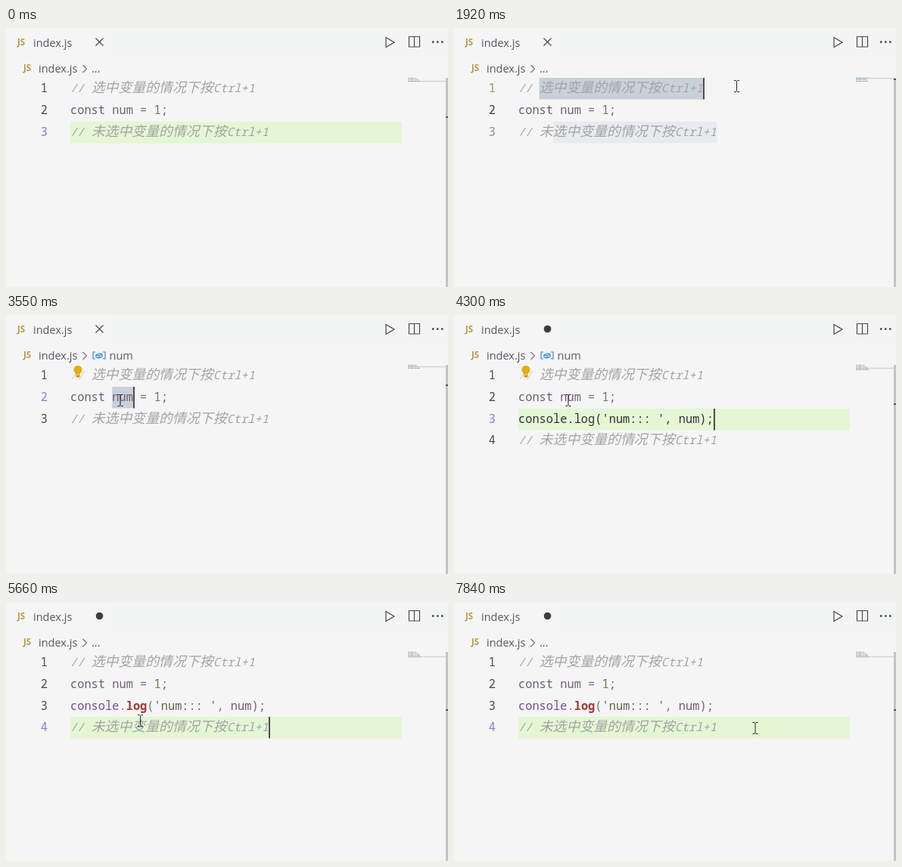
Write an HTML page that moves like this. It is 584 px wide and 343 px high and loops after 8 s.

```html
<!DOCTYPE html>
<html lang="zh">
<head>
<meta charset="utf-8">
<style>
  html, body { margin: 0; width: 100%; height: 100%; overflow: hidden; background: #f5f5f5; }
  svg { display: block; width: 100vw; height: 100vh; }
  text { white-space: pre; }
  .ui { font: 14.5px "Open Sans", "Noto Sans", sans-serif; fill: #5a565e; }
  .js { font: bold 11.5px "Open Sans", sans-serif; fill: #b79d48; }
  .code { font: 15.35px "Noto Sans Mono", "DejaVu Sans Mono", monospace; }
  .comment { font-style: italic; fill: #a4a4a4; }
  .cjk { font: italic 300 17.9px "Noto Sans CJK SC", "Noto Sans CJK", sans-serif; }
  .bold { font-weight: bold; }
  .line { fill: none; stroke: #4d4650; stroke-width: 1.2; }
  .blue { stroke: #2d8fd0; }
</style>
</head>
<body>
<svg viewBox="0 0 584 343" preserveAspectRatio="none">
  <rect width="584" height="343" fill="#f5f5f5"/>
  <rect x="140" width="444" height="38" fill="#f3f5f4"/>

  <text class="js" x="15" y="23">JS</text>
  <text class="ui" x="36" y="25">index.js</text>
  <path id="close" class="line" d="M118.500 13.500l10 10m0-10l-10 10"/>
  <circle id="dirty" cx="123.500" cy="18.500" r="4.800" fill="#3c3c3c"/>
  <path class="line" d="M502 12.500v13l11-6.500z"/>
  <path class="line" d="M532.500 11.500h14v13.500h-14zM539.500 11.500v13.500"/>
  <path d="M563 18.500h2.500m3.500 0h2.500m3.500 0h2.500" stroke="#4d4650" stroke-width="2.400"/>

  <text class="js" x="23" y="57">JS</text>
  <text class="ui" x="43" y="59">index.js</text>
  <path class="line" d="M101.500 49l5 5-5 5" style="stroke:#777"/>
  <text id="crumbDots" class="ui" x="113" y="59">...</text>
  <g id="crumbNum">
    <path class="line blue" d="M118 49h-3v9h3M128 49h3v9h-3"/>
    <path class="line blue" d="M119 53l4-2 4 1v3l-4 2-4-1zM119 53l4 1 4-2M123 54v3"/>
    <text class="ui" x="136.500" y="59">num</text>
  </g>

  <rect id="active" x="85" width="438" height="28.500" fill="#e4f6d4"/>
  <rect id="selection" height="28.500" fill="#c9d0d9"/>
  <rect id="match" x="131" y="124" height="28.500" fill="#e7ebed"/>
  <g id="numbers"></g>
  <g id="code"></g>
  <g id="bulb">
    <rect x="86" y="-8" width="18" height="21" fill="#f5f5f5" opacity=".6"/>
    <path d="M92.500 2h5v7h-5z" fill="#c89a18"/>
    <circle cx="95" cy="-1" r="5.500" fill="#e2ae10"/>
    <path d="M93 5.500h4" stroke="#f5f0dc"/>
  </g>
  <rect id="caret" width="2" height="28.500" fill="#54494d"/>

  <g id="minimap"></g>
  <rect id="miniSelection" x="531" height="2" fill="#a9bfd4" opacity=".6"/>
  <rect x="581" y="66" width="3" height="277" fill="#c4c4c4"/>
  <rect id="tick" x="581" width="3" height="2" fill="#555"/>

  <g id="mouse">
    <circle id="press" r="12" fill="#ffe92e" opacity=".75"/>
    <path d="M-3.500-7.500h2.500l1 1 1-1h2.500M0-6.500v13M-3.500 7.500h2.500l1-1 1 1h2.500" fill="none" stroke="#222"/>
  </g>
</svg>
<script>
const LOOP = 8000, LEFT = 85, CHAR = 9.21, HAN = 17.9, ROW = 28.7, BLINK = 500;

const CUE = {
  enter: 210, grab: 1370, drag: 1440, drop: 1900, click: 3120, select: 3260,
  insert: 4220, colour: 4500, lineEnd: 5200, triple: 6140, deselect: 7340
};

const $ = id => document.getElementById(id);
const column = n => LEFT + n * CHAR;
const rowTop = row => Math.round(66.3 + ROW * (row - 1));
const baseline = row => rowTop(row) + 18.7;
const between = (t, a, b) => t >= a && t < b;
const easeOut = k => 1 - (1 - k) ** 2;
const set = (el, attrs) => { for (const k in attrs) el.setAttribute(k, attrs[k]); };
const toggle = (el, on) => { el.style.display = on ? '' : 'none'; };
const show = (id, on) => toggle($(id), on);

function add(parent, tag, attrs, content = '') {
  const el = document.createElementNS('http://www.w3.org/2000/svg', tag);
  set(el, attrs);
  el.textContent = content;
  return parent.appendChild(el);
}

// Runs are [text, colour, extra class], laid out on the character grid.
function codeLine(row, runs) {
  const g = add($('code'), 'g', {});
  let length = 0;
  for (const [text, fill, extra = ''] of runs) {
    add(g, 'text', { x: column(length), y: baseline(row), fill, class: 'code ' + extra }, text);
    length += text.length;
  }
  return g;
}

function commentLine(row, han) {
  const g = add($('code'), 'g', {}), y = baseline(row), x = column(3);
  add(g, 'text', { x: LEFT, y, class: 'code comment' }, '//');
  add(g, 'text', { x, y, class: 'comment cjk' }, han);
  add(g, 'text', { x: x + han.length * HAN, y, class: 'code comment' }, 'Ctrl+1');
  return g;
}

commentLine(1, '选中变量的情况下按');
codeLine(2, [['const ', '#5c6472'], ['num ', '#6d6373'], ['= ', '#777'], ['1', '#8a6c49'], [';', '#666']]);
const plainLog = codeLine(3, [["console.log('num::: ', num);", '#2f3438']]);
const colourLog = codeLine(3, [['console', '#7a4a98'], ['.', '#777'], ['log', '#a03a38', 'bold'],
  ['(', '#777'], ["'num::: '", '#5c6650'], [', ', '#777'], ['num', '#765482'], [');', '#666']]);
const lastComment = commentLine(3, '未选中变量的情况下按');

const numbers = [1, 2, 3, 4].map(n => add($('numbers'), 'text',
  { x: 55, y: baseline(n), class: 'code', 'text-anchor': 'end' }, n));

const miniActive = add($('minimap'), 'rect', { x: 531, width: 50, height: 1.5, fill: '#d5d5d5' });
const miniRows = numbers.map((_, i) => add($('minimap'), 'path', {
  d: `M531 ${66.5 + 2 * i}h${12 + 2 * i}`, stroke: '#a5a5aa', 'stroke-dasharray': '2 .7 5 1' }));

const ENTRY = [420, 340];
const GLIDES = [
  { start: CUE.enter, end: 1220, to: [121, 78] },
  { start: CUE.drag, end: 1800, to: [374, 77] },
  { start: 1920, end: 2720, to: [151, 113] },
  { start: 4320, end: 5030, to: [374, 177] },
  { start: 5350, end: 5660, to: [178, 157] },
  { start: 5660, end: 5940, to: [118, 168] },
  { start: 6640, end: 6980, to: [398, 167] }
];

function mouseAt(t) {
  let pos = ENTRY;
  for (const { start, end, to } of GLIDES) {
    if (t < start) break;
    const k = easeOut(Math.min(1, (t - start) / (end - start)));
    pos = pos.map((p, axis) => p + (to[axis] - p) * k);
  }
  return pos;
}

// Caret position on the first line nearest to x.
function snap(x) {
  const start = column(3), latin = start + 9 * HAN;
  if (x < latin) return start + Math.max(0, Math.round((x - start) / HAN)) * HAN;
  return latin + Math.min(6, Math.round((x - latin) / CHAR)) * CHAR;
}

// Current row, caret, selection start (if any) and when the caret last moved.
function editorAt(t, mouseX) {
  const lineEnd = column(3) + 10 * HAN + 6 * CHAR;
  if (t < CUE.grab) return { row: 3, caret: null };
  if (t < CUE.drag) return { row: 1, caret: column(3), since: CUE.grab };
  if (t < CUE.click) return { row: 1, from: column(3), caret: snap(mouseX), since: Math.min(t, 1800) };
  if (t < CUE.select) return { row: 2, caret: column(7), since: CUE.click };
  if (t < CUE.insert) return { row: 2, from: column(6), caret: column(9), since: CUE.select };
  if (t < CUE.lineEnd) return { row: 3, caret: column(28), since: CUE.insert };
  if (t < CUE.triple) return { row: 4, caret: lineEnd, since: CUE.lineEnd };
  if (t < CUE.deselect) return { row: 4, from: LEFT, caret: lineEnd, since: CUE.triple + 260 };
  return { row: 4, caret: lineEnd, since: CUE.deselect };
}

function bulbRowAt(t) {
  if (between(t, CUE.drop + 300, CUE.click + 360)) return 2;
  if (between(t, CUE.select + 290, CUE.colour)) return 1;
  if (between(t, CUE.triple + 640, CUE.deselect)) return 3;
  return 0;
}

function pressedAt(t) {
  const clicked = [CUE.click, CUE.lineEnd, CUE.deselect].some(c => between(t, c, c + 220));
  const tripled = between(t, CUE.triple, CUE.triple + 390) && (t - CUE.triple) % 130 < 80;
  return clicked || tripled || between(t, CUE.grab, CUE.drop);
}

function numberColour(n, row, dragged) {
  if (dragged) return n % 2 ? '#9c9272' : '#454a48';
  return n === row ? '#8882cb' : '#4b4e48';
}

function draw(t) {
  const [mx, my] = mouseAt(t);
  const { row, from, caret, since } = editorAt(t, mx);
  const selected = from !== undefined, width = selected ? caret - from : 0;
  const inserted = t >= CUE.insert, coloured = t >= CUE.colour, y = rowTop(row);
  const dragged = between(t, CUE.drag, CUE.click);
  const crumb = between(t, CUE.select + 220, CUE.colour);

  show('close', !inserted);
  show('dirty', inserted);
  show('crumbNum', crumb);
  show('crumbDots', !crumb);

  show('active', !selected);
  set($('active'), { y });
  show('selection', selected);
  set($('selection'), { x: from || 0, y, width });
  show('match', dragged);
  set($('match'), { width: dragged ? width : 0 });
  show('caret', caret !== null && (t - since) % (2 * BLINK) < BLINK);
  set($('caret'), { x: Math.round(caret), y });

  toggle(plainLog, inserted && !coloured);
  toggle(colourLog, coloured);
  set(lastComment, { transform: `translate(0 ${inserted ? rowTop(4) - rowTop(3) : 0})` });
  numbers.forEach((el, i) => { el.style.fill = numberColour(i + 1, row, dragged); });
  toggle(numbers[3], inserted);
  toggle(miniRows[3], inserted);

  const bulbRow = bulbRowAt(t);
  show('bulb', bulbRow);
  set($('bulb'), { transform: `translate(0 ${rowTop(bulbRow) + 7.5})` });

  set(miniActive, { y: 63.8 + 2 * row });
  show('miniSelection', selected);
  set($('miniSelection'), { y: 63.5 + 2 * row, width: width / 13 });
  set($('tick'), { y: 67 + 25 * (row - 1) });

  show('mouse', t >= CUE.enter);
  set($('mouse'), { transform: `translate(${mx} ${my})` });
  show('press', pressedAt(t));
}

const begin = performance.now();
function frame() {
  draw((performance.now() - begin) % LOOP);
  requestAnimationFrame(frame);
}
frame();
</script>
</body>
</html>
```
